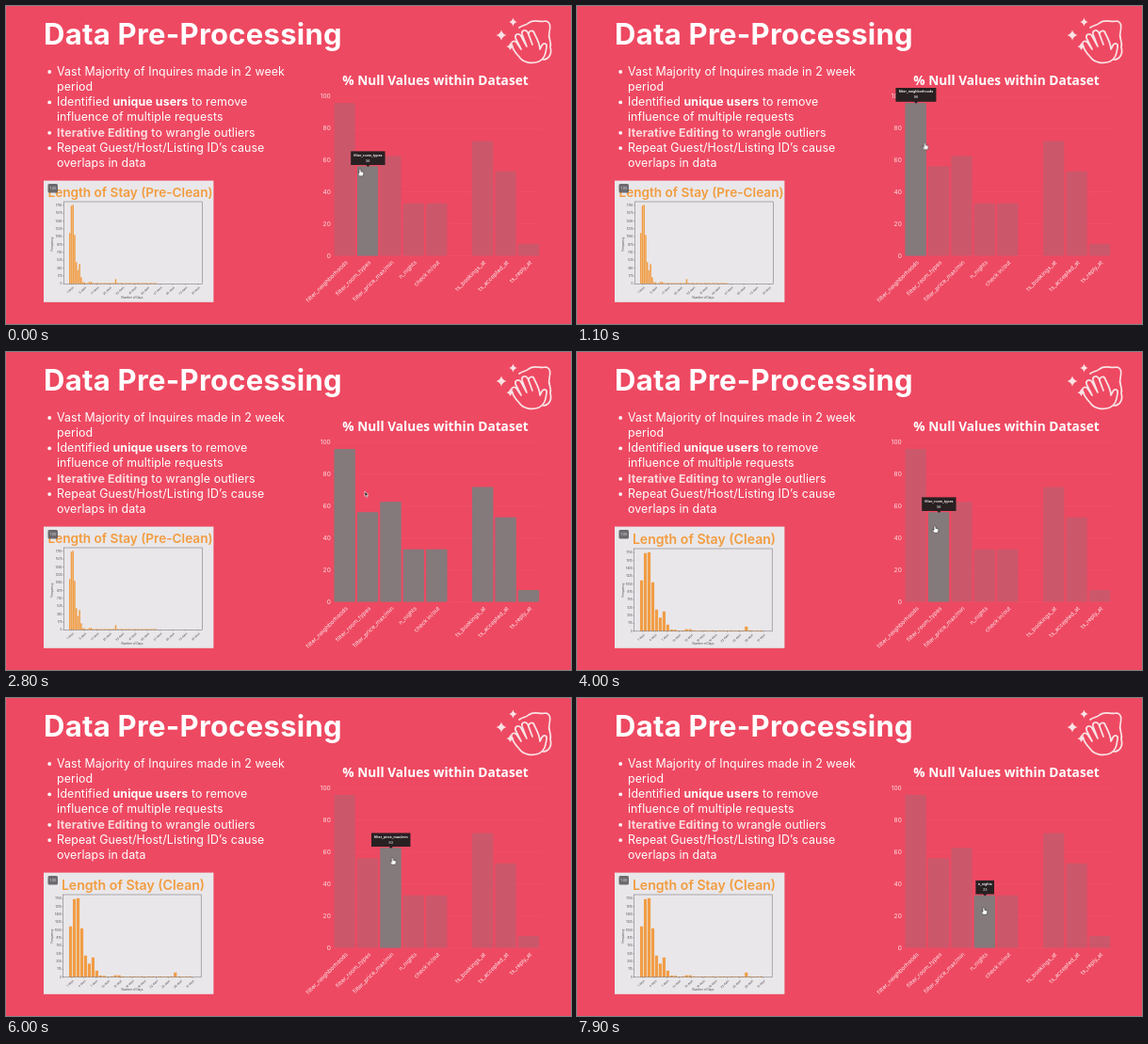
An HTML page that plays this animation: 600x338 px, repeating every 8000 ms.

```html
<!DOCTYPE html>
<html lang="en">
<head>
<meta charset="utf-8">
<title>Data Pre-Processing</title>
<style>
html, body { margin: 0; width: 100%; height: 100%; overflow: hidden; background: #ee4962; }
svg { display: block; width: 600px; height: 338px; font-family: Inter, "Open Sans", sans-serif; fill: #fff; }
.title { font-size: 31px; font-weight: 700; letter-spacing: .27px; }
.list { font-size: 12.4px; letter-spacing: .1px; }
.list tspan { font-weight: 700; }
.list .soft { fill: #fcd8dc; }
.icon { fill: none; stroke: #f9e3e5; stroke-width: 1.7; stroke-linecap: round; stroke-linejoin: round; }
.head { font: 700 13.7px "Open Sans", "Noto Sans", sans-serif; }
.tick { font-size: 6.6px; fill: #fbdde1; text-anchor: end; }
.label { font-size: 6.1px; fill: #fdeaec; }
.grid { stroke: #fff; stroke-opacity: .07; stroke-width: .6; }
.dim { fill: #cb576a; }
.full { fill: #84797b; }
.tip { font-size: 3.6px; font-weight: 600; text-anchor: middle; }
.tip path { fill: #292022; }
.card { font-size: 3px; fill: #47454a; }
.card .heading { fill: #f29c3f; font-size: 14.1px; font-weight: 600; text-anchor: middle; }
.card .wide { font-size: 13.6px; }
.card .speed { fill: #dedce0; font-size: 3.8px; }
.bars { fill: #f19d45; }
.frame { fill: none; stroke: #6b686e; stroke-width: .5; }
.end { text-anchor: end; }
.mid { text-anchor: middle; }

#all, .hover, .tip, .card .view, #cursor, #hand, #arrow { animation: 8s linear infinite; }
#all { animation-name: all; }
#hover0 { animation-name: hover0; }
#hover1 { animation-name: hover1; }
#hover2 { animation-name: hover2; }
#hover3 { animation-name: hover3; }
#tip0 { animation-name: tip0; }
#tip1 { animation-name: tip1; }
#tip2 { animation-name: tip2; }
#tip3 { animation-name: tip3; }
#before { animation-name: before; }
#after { animation-name: after; }
#cursor { animation-name: move; }
#hand { animation-name: hand; }
#arrow { animation-name: arrow; }
.tip, .card .view, #hand, #arrow { animation-timing-function: step-end; }

@keyframes all {
  0%, 3% { opacity: 0; } 5%, 7.75% { opacity: 1; } 10%, 25.7% { opacity: 0; }
  28%, 42% { opacity: 1; } 44.5%, 100% { opacity: 0; }
}
@keyframes hover0 { 0%, 5% { opacity: 0; } 5.01%, 28% { opacity: 1; } 28.01%, 100% { opacity: 0; } }
@keyframes hover1 {
  0%, 5% { opacity: 1; } 5.01%, 41.9% { opacity: 0; }
  41.91%, 60.5% { opacity: 1; } 62.5%, 100% { opacity: 0; }
}
@keyframes hover2 { 0%, 60.5% { opacity: 0; } 62.5%, 83% { opacity: 1; } 85%, 100% { opacity: 0; } }
@keyframes hover3 { 0%, 83% { opacity: 0; } 85%, 100% { opacity: 1; } }
@keyframes tip0 { 0% { opacity: 0; } 7% { opacity: 1; } 24.4%, 100% { opacity: 0; } }
@keyframes tip1 { 0% { opacity: 1; } 3% { opacity: 0; } 42.5% { opacity: 1; } 61%, 100% { opacity: 0; } }
@keyframes tip2 { 0% { opacity: 0; } 61% { opacity: 1; } 83.5%, 100% { opacity: 0; } }
@keyframes tip3 { 0% { opacity: 0; } 83.5%, 100% { opacity: 1; } }
@keyframes before { 0% { opacity: 1; } 40%, 100% { opacity: 0; } }
@keyframes after { 0% { opacity: 0; } 40%, 100% { opacity: 1; } }
@keyframes hand { 0% { opacity: 1; } 3% { opacity: 0; } 6.5% { opacity: 1; } 24.4% { opacity: 0; } 42%, 100% { opacity: 1; } }
@keyframes arrow { 0% { opacity: 0; } 3% { opacity: 1; } 6.5% { opacity: 0; } 24.4% { opacity: 1; } 42%, 100% { opacity: 0; } }
@keyframes move {
  0% { transform: translate(376px, 173.5px); }
  3% { transform: translate(375px, 167px); }
  7.5%, 20% { transform: translate(369.5px, 145.5px); }
  25% { transform: translate(379px, 140px); }
  35% { transform: translate(381px, 148px); }
  42% { transform: translate(380px, 172px); }
  50% { transform: translate(380px, 185px); }
  58% { transform: translate(388px, 183px); }
  61% { transform: translate(398px, 178px); }
  68%, 76% { transform: translate(410.5px, 170px); }
  83% { transform: translate(420px, 205px); }
  88%, 100% { transform: translate(432px, 223px); }
}
</style>
</head>
<body>
<svg viewBox="0 0 600 338">
  <text class="title" x="40" y="41">Data Pre-Processing</text>

  <g class="icon">
    <path d="M545 23C549 20 552 21 555 18C561 13 567 18 573 16C579 17 578 23 577 28C575 34 580 38 578 44C580 50 577 57 570 57"/>
    <path d="M545 54C541 50 538 45 537 41C536 37 541 36 543 40L547 46L541 34C540 30 545 28 547 32L553 43L548 30C547 26 552 24 554 28L559 41L555 30C555 26 560 25 561 29C564 35 567 40 567 46L569 42C571 38 575 40 574 44C573 51 572 56 566 59C558 62 549 60 545 54"/>
  </g>
  <g id="sparkles" fill="#f9e3e5"></g>

  <g class="list">
    <text x="54" y="73.7">Vast Majority of Inquires made in 2 week</text>
    <text x="54" y="90">period</text>
    <text x="54" y="106.2">Identified <tspan>unique users</tspan> to remove</text>
    <text x="54" y="122.4">influence of multiple requests</text>
    <text x="54" y="138.6"><tspan class="soft">Iterative Editing</tspan> to wrangle outliers</text>
    <text x="54" y="154.9">Repeat Guest/Host/Listing ID’s cause</text>
    <text x="54" y="171.1">overlaps in data</text>
    <circle cx="46.2" cy="70" r="1.9"/>
    <circle cx="46.2" cy="102.4" r="1.9"/>
    <circle cx="46.2" cy="134.8" r="1.9"/>
    <circle cx="46.2" cy="151.1" r="1.9"/>
  </g>

  <g class="card">
    <rect x="40" y="185.6" width="180.4" height="129.2" fill="#e9e7ea"/>
    <g id="before" class="view"><text class="heading wide" x="132" y="203.4">Length of Stay (Pre-Clean)</text></g>
    <g id="after" class="view"><text class="heading" x="135" y="204">Length of Stay (Clean)</text></g>
    <rect x="44.5" y="189" width="10.5" height="9.5" rx="1.5" fill="#5e5c62" opacity=".9"/>
    <text class="speed mid" x="49.8" y="195.2">1.00</text>
    <text class="mid" transform="translate(50 253) rotate(-90)">Frequency</text>
    <text class="mid" x="134" y="311">Number of Days</text>
  </g>

  <text class="head" x="357.3" y="83.6">% Null Values within Dataset</text>
  <g id="axis"></g>
  <g id="faded" class="dim"></g>
  <g id="all" class="full"></g>
  <g id="hovers" class="full"></g>
  <g id="tips"></g>

  <g id="cursor">
    <path id="hand" d="M-1 0Q0-1 .9 0V2.4L3.3 3.1Q4 3.4 3.9 4.2L3.2 7.2H-.6L-3 4.4Q-2.6 3.4-1 4.5Z" fill="#fff" stroke="#222" stroke-width=".55"/>
    <path id="arrow" d="M0 0V5.4L1.3 4.3L2.2 6.3L3.1 5.9L2.2 4H4Z" fill="#222" stroke="#fff" stroke-width=".6"/>
  </g>
</svg>
<script>
const $ = id => document.getElementById(id);
const add = (id, markup) => $(id).insertAdjacentHTML('beforeend', markup);
const rect = (x, y, w, h, attrs = '') => `<rect x="${x}" y="${y}" width="${w}" height="${h}" ${attrs}/>`;

// Sparkles: centre and radius
for (const [x, y, r] of [[538.5, 17, 4.5], [526, 31, 5.5], [535.5, 43, 4]]) {
  const q = r * 0.2;
  add('sparkles', `<path d="M${x} ${y - r}Q${x + q} ${y - q} ${x + r} ${y}Q${x + q} ${y + q} ${x} ${y + r}Q${x - q} ${y + q} ${x - r} ${y}Q${x - q} ${y - q} ${x} ${y - r}"/>`);
}

// Null value chart
const base = 265.6, unit = 1.695, pitch = 24.42, barWidth = 22.3;
const columns = [
  ['filter_neighborhoods', 96], ['filter_room_types', 56.3], ['filter_price_max/min', 62.7],
  ['n_nights', 33], ['check in/out', 33], ['', 0],
  ['ts_bookings_at', 72], ['ts_accepted_at', 53], ['ts_reply_at', 7.5]
];
for (let v = 0; v <= 100; v += 20) {
  const y = base - v * unit;
  add('axis', `<path class="grid" d="M348 ${y}H569"/><text class="tick" x="344.8" y="${y + 2.2}">${v}</text>`);
}
columns.forEach(([name, value], i) => {
  if (!name) return;
  const x = 348.5 + i * pitch, top = base - value * unit, mid = x + barWidth / 2;
  const bar = (attrs = '') => rect(x, top, barWidth, value * unit, 'rx=".8" ' + attrs);
  add('axis', `<text class="label end" transform="translate(${mid + 3.6} 273) rotate(-45)">${name}</text>`);
  add('faded', bar());
  add('all', bar());
  if (i > 3) return;
  add('hovers', bar(`class="hover" id="hover${i}"`));
  const half = [21.5, 18.2, 20.8, 10][i];
  add('tips', `<g class="tip" id="tip${i}" transform="translate(${mid + .3} ${top + 1})">
    <path d="M${-half}-17H${half}V-2.2H2L0-.2L-2-2.2H${-half}Z"/>
    <text y="-11.6">${name}</text><text y="-5.4" font-weight="400">${Math.round(value)}</text></g>`);
});

// Length of stay: one data set, drawn with wide and narrow bins
const stays = [54, 83, 84, 52, 23, 14.5, 21, 7, 1.8, 1.6];
for (let i = stays.length; i < 54; i++) stays.push(0.5 + 0.5 * Math.abs(Math.sin(i * 1.9)));
stays[12] = stays[13] = 2.1;
stays[28] = 5;

function histogram(id, { left, right, top, bottom, step, width, count, days, gap }) {
  let out = '';
  stays.slice(0, count).forEach((h, i) => { out += rect(67 + i * step, bottom - h, width, h); });
  out = `<g class="bars">${out}</g>` + rect(left, top, right - left, bottom - top, 'class="frame"');
  for (let i = 0; i <= 10; i++) {
    const y = bottom - i * 8.35;
    out += `<path class="frame" d="M${left - 1} ${y}h1"/><text class="end" x="${left - 1.8}" y="${y + 1}">${i * 175}</text>`;
  }
  for (let i = 0; i < 11; i++) {
    const x = 70 + i * gap;
    out += `<path class="frame" d="M${x} ${bottom}v1"/><text class="end" transform="translate(${x + 2} ${bottom + 4}) rotate(-45)">${1 + i * days} days</text>`;
  }
  add(id, out);
}
histogram('before', { left: 61.3, right: 208.3, top: 208, bottom: 295.3, step: 1.74, width: 1.5, count: 54, days: 8, gap: 13.4 });
histogram('after', { left: 60.7, right: 207.2, top: 209, bottom: 296.8, step: 3.97, width: 3.2, count: 33, days: 3, gap: 12.8 });
</script>
</body>
</html>
```
